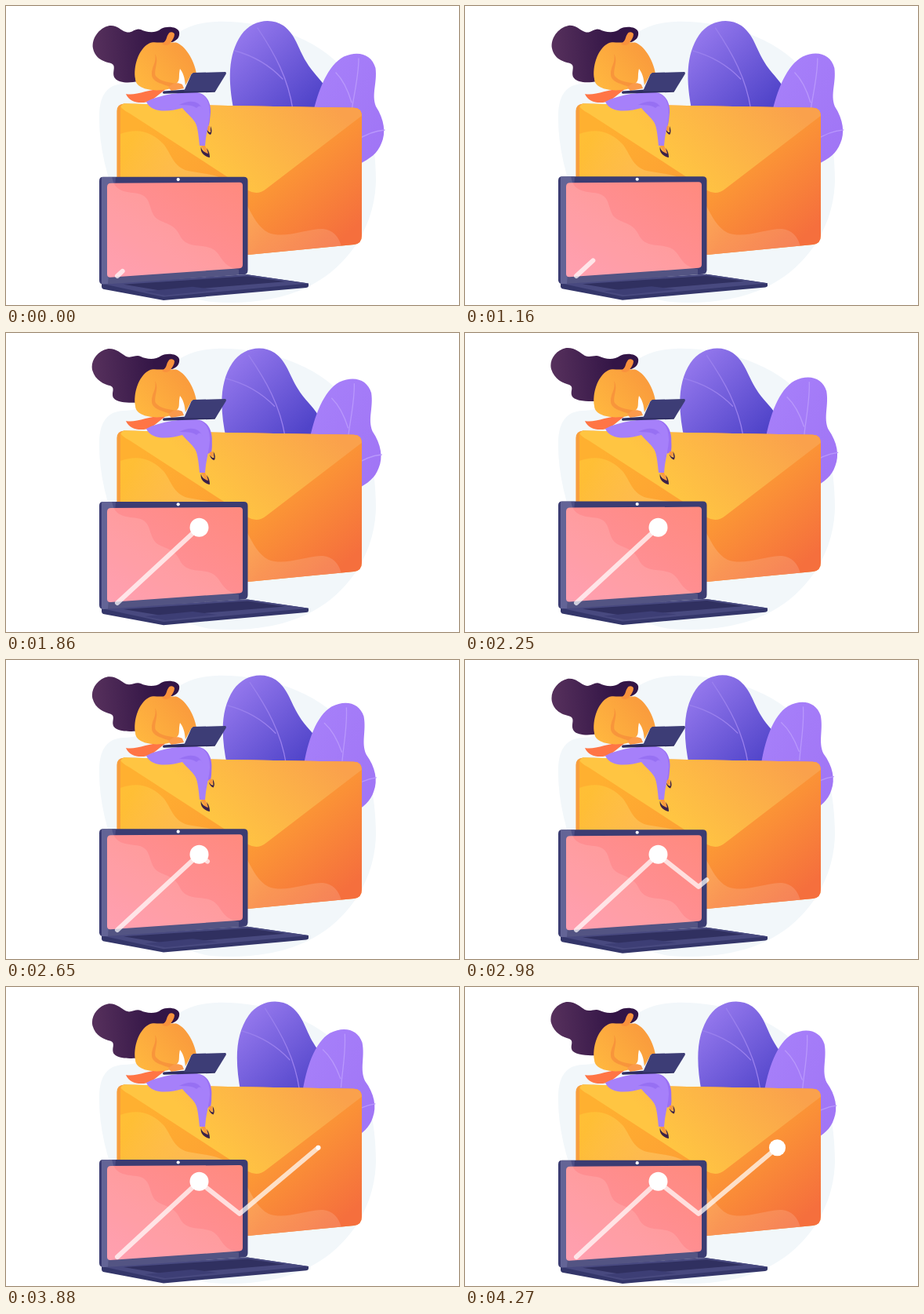
An HTML page that plays this animation: 578x381 px, repeating every 4.34 s.

```html
<!DOCTYPE html>
<html lang="en">
<head>
<meta charset="utf-8">
<title>Mail campaign</title>
<style>
html, body { margin: 0; width: 100%; height: 100%; overflow: hidden; background: #fff; }
svg { display: block; width: 578px; height: 381px; }
.vein { fill: none; stroke-width: 1.3; stroke-linecap: round; }
</style>
</head>
<body>
<svg viewBox="0 0 578 381">
  <defs>
    <linearGradient id="leafDark" x1="0" y1=".1" x2=".8" y2=".9"><stop offset="0" stop-color="#9a7cf0"/><stop offset="1" stop-color="#5044c9"/></linearGradient>
    <linearGradient id="leafLight" x1="0" y1="0" x2="1" y2="1"><stop offset="0" stop-color="#a781fa"/><stop offset="1" stop-color="#a074f5"/></linearGradient>
    <linearGradient id="mail" gradientUnits="userSpaceOnUse" x1="210" y1="120" x2="390" y2="330"><stop offset="0" stop-color="#ffb030"/><stop offset=".5" stop-color="#fd9f34"/><stop offset="1" stop-color="#f56f3d"/></linearGradient>
    <linearGradient id="flap" gradientUnits="userSpaceOnUse" x1="275" y1="215" x2="400" y2="105"><stop offset="0" stop-color="#ffc542"/><stop offset="1" stop-color="#faa14c"/></linearGradient>
    <linearGradient id="mailWave" gradientUnits="userSpaceOnUse" x1="146" y1="200" x2="330" y2="290"><stop offset="0" stop-color="#ffd13c" stop-opacity=".45"/><stop offset="1" stop-color="#fff" stop-opacity=".14"/></linearGradient>
    <linearGradient id="screen" x1="0" y1="1" x2="1" y2="0"><stop offset="0" stop-color="#ff93a6"/><stop offset="1" stop-color="#ff8a7e"/></linearGradient>
    <linearGradient id="hairFill" gradientUnits="userSpaceOnUse" x1="112" y1="50" x2="190" y2="45"><stop offset="0" stop-color="#56305c"/><stop offset="1" stop-color="#331546"/></linearGradient>
    <linearGradient id="knit" x1=".1" y1=".9" x2=".9" y2=".4"><stop offset="0" stop-color="#ffb63f"/><stop offset="1" stop-color="#fa9d3d"/></linearGradient>
    <clipPath id="mailClip"><path d="M150 124.600L444 129.700Q454 130 454 141V292Q454 303 444 304L309 317L146 333V128Z"/></clipPath>
    <clipPath id="lidClip"><path id="lid" d="M124 217H303.500Q308.500 217 308.500 222V336Q308.500 341 303.500 341.500L125 354Q119 354 119 349V222Q119 217 124 217Z"/></clipPath>
  </defs>

  <path fill="#f2f7fa" d="M119 138C120 112 130 100 150 99C178 99 184 84 193 66C205 38 232 21 268 20C325 18 395 38 432 82C462 118 472 175 472 222C471 280 438 332 385 358C345 377 300 380 262 377C215 372 175 330 150 270C130 225 118 180 119 138Z"/>

  <g id="leafA">
    <path fill="url(#leafDark)" d="M291 135C283 95 283 62 300 37C313 18 338 14 354 25C370 37 372 53 383 71C391 85 402 93 409 106L414 140Z"/>
    <path class="vein" stroke="#9a80ee" d="M321 28C343 61 360 92 366 132M292 57C314 63 336 75 353 93"/>
  </g>
  <g id="leafB">
    <path fill="url(#leafLight)" d="M391 140C398 107 411 75 431 64.500C450 56 467 62 471.500 79C474 98 466 112 472 128C483 145 485 162 479 175C474 188 465 194 450 202L395 180Z"/>
    <path class="vein" stroke="#b998fc" d="M450 67C450 90 444 112 441 134M421 85C430 94 436 106 441 123M483 158C470 159 458 164 446 172"/>
  </g>

  <path fill="#f89e3d" d="M151 124.600L444 129.700Q454 130 454 141V292Q454 303 444 304L309 317L141.400 333V134Q141.400 125 151 124.600Z"/>
  <g clip-path="url(#mailClip)">
    <path fill="url(#mail)" d="M146 120H455V340H146Z"/>
    <path fill="url(#mailWave)" d="M146 163C170 154 188 162 201 176C211 188 213 205 232 210C250 214 274 213 290 230C311 250 313 277 335 289C356 297 382 284 404 284C417 285 425 294 428 307V340H146Z"/>
    <path fill="url(#flap)" d="M146 120H455V139L332 233Q321 242 309 235L158 137Q146 131 146 126Z"/>
  </g>

  <g id="woman">
    <path fill="#ff7545" d="M153 112C165 115 180 106 205 105L186 120C176 125 158 125 153 112Z"/>
    <path id="hair" fill="url(#hairFill)"/>
    <path fill="#fff" d="M221 80L229 82L226 105L219 104Z"/>
    <path fill="url(#knit)" d="M182 48C188 45 192 47 198 46.500L217 46.500C228 50 240 68 243 86L237 86L229 101C228 91 226 85 222 80C220 88 222 94 219 97C214 104 207 107 199 107C181 109 165 103 165 93C162 78 169 55 182 48Z"/>
    <path fill="#f6853a" opacity=".6" d="M190 61C196 70 188 82 191 89C196 96 207 97 217 99L209 103C199 99 187 97 186 88C185 77 193 72 190 61Z"/>
    <path fill="#f9923d" d="M199 48C206 44 204 40 207 36C209 32 214 33 215 36C215 40 212 44 209 48Q204 52 199 48Z"/>
    <path fill="#fb9a4b" d="M207 104C212 98 219 97 225 100L227 105L211 108Z"/>
    <g id="leg">
      <path fill="#9a70f4" d="M236 110C254 108 262 121 261 136C260 145 260 149 258 154L253 155C254 143 249 128 239 122Z"/>
      <path fill="#f9973e" d="M256 153L260 153L261 159L257 159Z"/>
      <path fill="#3b2148" d="M255.500 156Q258 161 261 161L261 153Q264 160 261 164Q257 163 255.500 156Z"/>
    </g>
    <path fill="#a680fa" d="M179 122C190 115 220 109 240 110C254 111 260 121 260 137C259 151 255 163 254 178L247 178C246 168 245 158 243 152C240 143 231 138 225 130C211 134 186 138 179 122Z"/>
    <path fill="#8d65ee" opacity=".6" d="M221 126C232 120 246 119 251 132C249 127 247 126 243 130C237 125 229 127 221 126Z"/>
    <path fill="#fa9a40" d="M249 178H254L259 189L255 189Z"/>
    <path fill="#3b2148" d="M249 179C249 184 254 187 258 188L256 181Q260 186 260 193C253 192 247 186 249 179Z"/>
    <path fill="#2e2d60" d="M201 108.500L230 106.500H268.500L266.500 109.800L201 111.800Q199 110.500 201 108.500Z"/>
    <path fill="#3d3d76" d="M239 85L280 84Q281.500 85 280.500 87L268.500 106.500Q267 108.500 264 108.500L227 108.500L236.500 87Z"/>
  </g>

  <g id="laptop">
    <path fill="#34366a" d="M122 353L308 341.500L386 352.800V356Q386 357.800 383 358.200L201 374.300L124 360Q122 359 122 357Z"/>
    <path fill="#48497f" d="M122 353L308 341.500L386 352.800L201 370Z"/>
    <path fill="#303060" d="M150 354L309 343.500L356 350.500L204 363Z"/>
    <path fill="#3d3e75" d="M177 363L238 357L270 361L203 368Z"/>
    <use href="#lid" fill="#3b3c72"/>
    <g clip-path="url(#lidClip)">
      <path fill="#4d4f87" d="M122 217H140L130 354H122Z"/>
      <path fill="url(#screen)" d="M134 225L298 224Q302 224 302 228V329Q302 333 298 333.500L133 345Q129 345 129 341V230Q129 225 134 225Z"/>
      <path fill="#fff" opacity=".12" d="M122 215H135C137 236 152 236 167 238C187 241 181 259 191 269C201 277 214 276 221 290C229 309 248 302 262 308C276 314 273 331 297 335L297 354H122Z"/>
    </g>
    <circle cx="219.700" cy="220.400" r="2.100" fill="#fff"/>
  </g>

  <polyline id="line" points="142,344 246,248 298,289 398,205" pathLength="1000" fill="none" stroke="#fff" stroke-opacity=".72" stroke-width="6" stroke-linecap="round" stroke-linejoin="round"/>
  <circle id="dotA" cx="246.500" cy="247.800" fill="#fff"/>
  <circle id="dotB" cx="398.500" cy="204.800" fill="#fff"/>
</svg>
<script>
const LOOP = 4340, HOLD = 1160, STEP = 77.7, START = HOLD - STEP;
const $ = id => document.getElementById(id);
const [leafA, leafB, hair, leg, laptop, line, dotA, dotB] =
  ["leafA", "leafB", "hair", "leg", "laptop", "line", "dotA", "dotB"].map($);

const head = "L178 62L186 47L205 47L212 46C218 44 222 40 221 33C219 26 205 25 198 29Z";
const hairLow = "M198 29C190 36 178 33 172 30C165 27 160 36 153 33C146 31 142 24 132 25C118 28 109 42 111 54C114 68 126 71 134 73C142 76 134 85 139 92C144 99 160 98 168 96" + head;
const hairHigh = "M198 29C190 35 178 33 172 30C166 27 160 32 153 29C147 25 140 18 129 19C115 22 107 35 110 46C114 59 125 64 133 66C140 69 133 75 137 81C142 87 158 87 166 87" + head;

function mixPath(a, b, k) {
  const ends = b.match(/\d+/g);
  let i = 0;
  return a.replace(/\d+/g, n => (+n + (ends[i++] - n) * k).toFixed(2));
}

// Piecewise linear value from [time, value] pairs.
function track(keys, t) {
  if (t <= keys[0][0]) return keys[0][1];
  for (let i = 1; i < keys.length; i++) {
    const [t0, v0] = keys[i - 1], [t1, v1] = keys[i];
    if (t < t1) return v0 + (v1 - v0) * (t - t0) / (t1 - t0);
  }
  return keys[keys.length - 1][1];
}

const TOTAL = 338.4;
const lineKeys = [[START, 9], [HOLD, 29], [1597, 141.5], [2570, 141.5], [3500, TOTAL]];
const dotAKeys = [[1590, 0], [1860, 12]];
const dotBKeys = [[3725, 0], [4270, 10.6]];

function draw(t) {
  const step = t < HOLD ? 0 : Math.floor((t - HOLD) / STEP + 0.02) + 1;
  const now = START + step * STEP, run = step * STEP;
  const sway = Math.sin(Math.PI * run / 2180);
  const lean = (1 - Math.cos((run + 60) * 0.077 * Math.PI / 180)) / 2;
  const swing = (1 - Math.cos(2 * Math.PI * run / 2180)) / 2;

  leafA.setAttribute("transform", `rotate(${-0.82 * sway} 370 900)`);
  leafB.setAttribute("transform", `rotate(${-4.05 * lean} 332 347)`);
  laptop.setAttribute("transform", `translate(0 ${0.7 - 3.1 * sway})`);
  hair.setAttribute("d", mixPath(hairLow, hairHigh, swing));
  leg.setAttribute("transform", `rotate(${-7.5 * swing} 245 118)`);

  const drawn = track(lineKeys, now) / TOTAL * 1000;
  line.setAttribute("stroke-dasharray", `${drawn} 2000`);
  dotA.setAttribute("r", track(dotAKeys, now));
  dotB.setAttribute("r", track(dotBKeys, now));
}

const origin = performance.now();
function tick() {
  draw((performance.now() - origin) % LOOP);
  requestAnimationFrame(tick);
}
tick();
</script>
</body>
</html>
```
